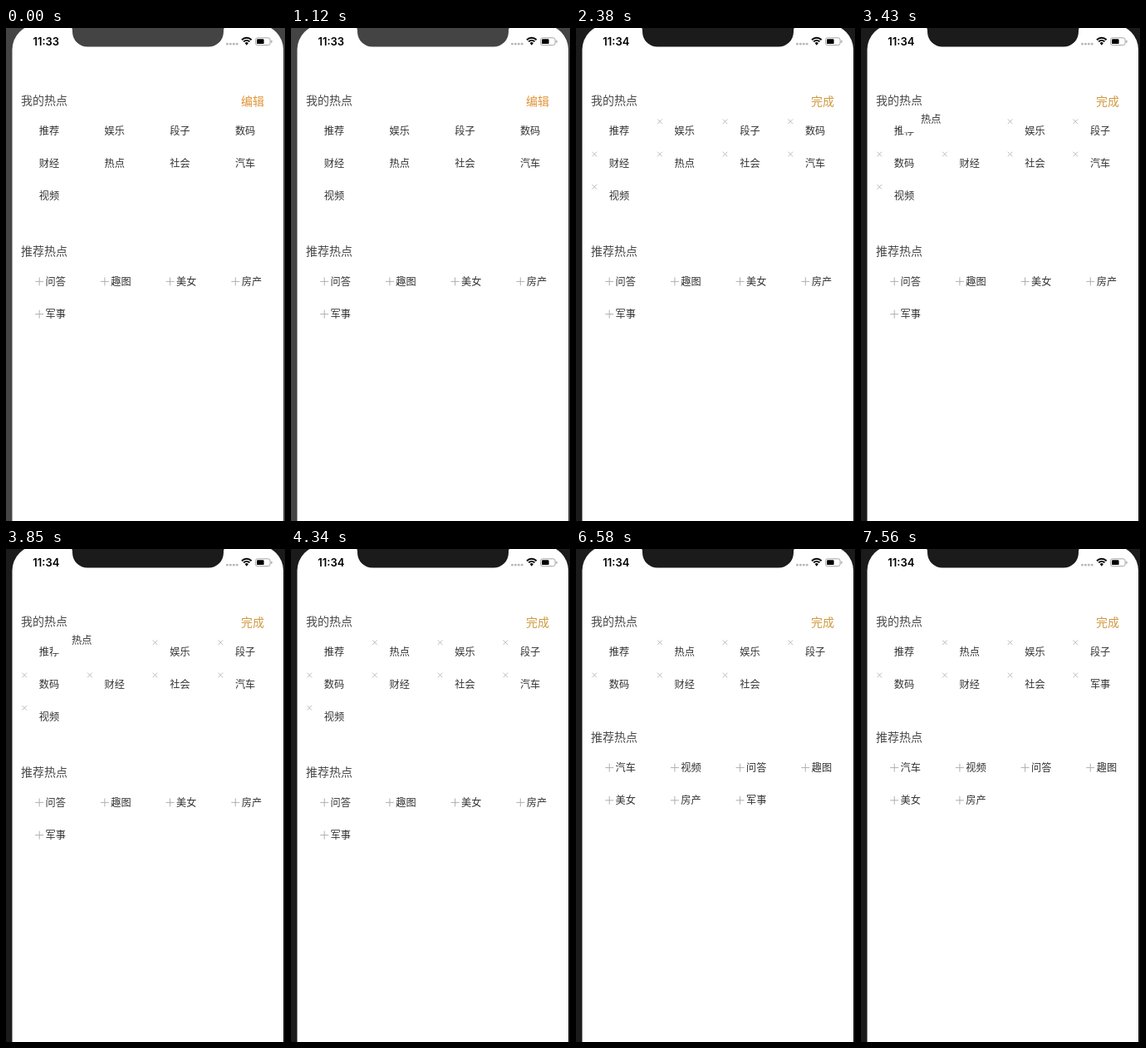
Recreate the animation shown at these times as an HTML page with a canvas. Size 336x592 px, loop 8 s.

```html
<!DOCTYPE html>
<html lang="zh-CN">
<head>
<meta charset="utf-8">
<style>
  html, body { margin: 0; width: 100%; height: 100%; overflow: hidden; background: #fff; }
  canvas { display: block; width: 336px; height: 592px; }
</style>
</head>
<body>
<canvas id="stage"></canvas>
<script>
const W = 336, H = 592, LOOP = 8000, TICK = 70;
const CJK = '"Noto Sans CJK SC", "Noto Sans CJK", sans-serif';
const canvas = document.getElementById('stage');
const ctx = canvas.getContext('2d');
const dpr = window.devicePixelRatio || 1;
canvas.width = W * dpr;
canvas.height = H * dpr;

const colX = i => 52 + (i % 4) * 78.7;
const rowY = i => Math.floor(i / 4) * 39.2;
const words = s => s.split(' ');

// Topic lists, each valid from time t on
const lists = [
  { t: 0, mine: words('推荐 娱乐 段子 数码 财经 热点 社会 汽车 视频'), more: words('问答 趣图 美女 房产 军事') },
  { t: 3430, mine: words('推荐 热点 娱乐 段子 数码 财经 社会 汽车 视频'), more: words('问答 趣图 美女 房产 军事') },
  { t: 5670, mine: words('推荐 热点 娱乐 段子 数码 财经 社会 汽车'), more: words('视频 问答 趣图 美女 房产 军事') },
  { t: 6580, mine: words('推荐 热点 娱乐 段子 数码 财经 社会'), more: words('汽车 视频 问答 趣图 美女 房产 军事') },
  { t: 7560, mine: words('推荐 热点 娱乐 段子 数码 财经 社会 军事'), more: words('汽车 视频 问答 趣图 美女 房产') }
];
const EDIT = 2310, DRAG = 3430, NUDGE = 3710, DROP = 4200, REST = 4340;

function text(s, cx, cy, size, color) {
  ctx.font = `400 ${size}px ${CJK}`;
  ctx.textAlign = 'center';
  ctx.fillStyle = color;
  ctx.fillText(s, cx, cy + size * 0.38);
}

function line(x1, y1, x2, y2) {
  ctx.beginPath();
  ctx.moveTo(x1, y1);
  ctx.lineTo(x2, y2);
  ctx.stroke();
}

function cross(x, y) {
  ctx.strokeStyle = '#b4b4b4';
  ctx.lineWidth = 0.9;
  line(x - 2.8, y - 2.8, x + 2.8, y + 2.8);
  line(x - 2.8, y + 2.8, x + 2.8, y - 2.8);
}

function plus(x, y) {
  ctx.strokeStyle = '#b0b0b0';
  ctx.lineWidth = 1;
  line(x - 5, y, x + 5, y);
  line(x, y - 5, x, y + 5);
}

function box(x, y, w, h, r, color) {
  ctx.beginPath();
  ctx.roundRect(x, y, w, h, r);
  ctx.fillStyle = color;
  ctx.fill();
}

function phone(bezel) {
  ctx.fillStyle = bezel;
  ctx.fillRect(0, 0, W, H);
  box(7.5, -4, 326.5, 640, 30, '#fff');
  ctx.fillStyle = bezel;
  ctx.beginPath();
  ctx.moveTo(78, -1);
  ctx.quadraticCurveTo(80, 0, 80, 3);
  ctx.arcTo(80, 22.5, 100, 22.5, 18);
  ctx.arcTo(262, 22.5, 262, 3, 18);
  ctx.lineTo(262, 3);
  ctx.quadraticCurveTo(262, 0, 264, -1);
  ctx.fill();
}

function statusBar(clock) {
  ctx.font = '600 13px Inter, sans-serif';
  ctx.textAlign = 'center';
  ctx.fillStyle = '#000';
  ctx.fillText(clock, 48.3, 20.7);

  for (let i = 0; i < 4; i++) box(265 + i * 3.9, 17.7, 2.9, 2.9, 1.4, '#b8b8b8');

  ctx.strokeStyle = '#000';
  ctx.lineWidth = 2;
  for (const r of [8.2, 5.1]) {
    ctx.beginPath();
    ctx.arc(289.8, 20, r, -Math.PI * 0.75, -Math.PI * 0.25);
    ctx.stroke();
  }
  ctx.fillStyle = '#000';
  ctx.beginPath();
  ctx.moveTo(289.8, 20.7);
  ctx.arc(289.8, 20.2, 3, -Math.PI * 0.75, -Math.PI * 0.25);
  ctx.fill();

  ctx.beginPath();
  ctx.roundRect(300.5, 11.8, 17.6, 8.8, 2.4);
  ctx.strokeStyle = '#a6a6a6';
  ctx.lineWidth = 1;
  ctx.stroke();
  box(302, 13.3, 8.6, 5.8, 1.2, '#000');
  box(319.2, 14.7, 1.3, 3.2, 0.7, '#a6a6a6');
}

// Progress in three steps, the first one visible at once
const steps = (t, from) => Math.max(0, Math.min(1, (Math.floor((t - from) / TICK) + 1) / 3));

function dragged(t) {
  const n = steps(t, NUDGE), d = steps(t, DROP);
  const x = 84.3 + 7 * n;
  return { x: x + (colX(1) - x) * d, y: 109 + 14 * d };
}

function draw(t) {
  const { mine, more } = lists.filter(l => l.t <= t).pop();
  const editing = t >= EDIT;
  const dragging = t >= DRAG && t < REST;
  ctx.setTransform(dpr, 0, 0, dpr, 0, 0);
  phone(t < 1820 ? '#444' : '#1b1b1b');
  statusBar(editing ? '11:34' : '11:33');

  text('我的热点', 46, 87, 14, '#4a4a4a');
  text(editing ? '完成' : '编辑', 297, 88, 14, editing ? '#cf9a40' : '#e0963a');
  mine.forEach((s, i) => {
    if (dragging && i === 1) return;
    const x = colX(i), y = 123.3 + rowY(i);
    text(s, x, y, 12.2, '#333');
    if (editing && i) cross(x - 29.8, y - 11);
  });

  const top = mine.length > 8 ? 267.5 : 225.7;
  text('推荐热点', 46, top, 14, '#4a4a4a');
  more.forEach((s, i) => {
    const x = colX(i), y = top + 36.9 + rowY(i);
    plus(x - 11.8, y);
    text(s, x + 7.8, y, 12.2, '#333');
  });

  if (dragging) {
    const p = dragged(t);
    ctx.fillStyle = '#fff';
    ctx.fillRect(p.x - 35, p.y - 16, 70, 32);
    text('热点', p.x, p.y, 12.2, '#333');
  }
}

const start = performance.now();
function frame() {
  draw((performance.now() - start) % LOOP);
  requestAnimationFrame(frame);
}
frame();
</script>
</body>
</html>
```
